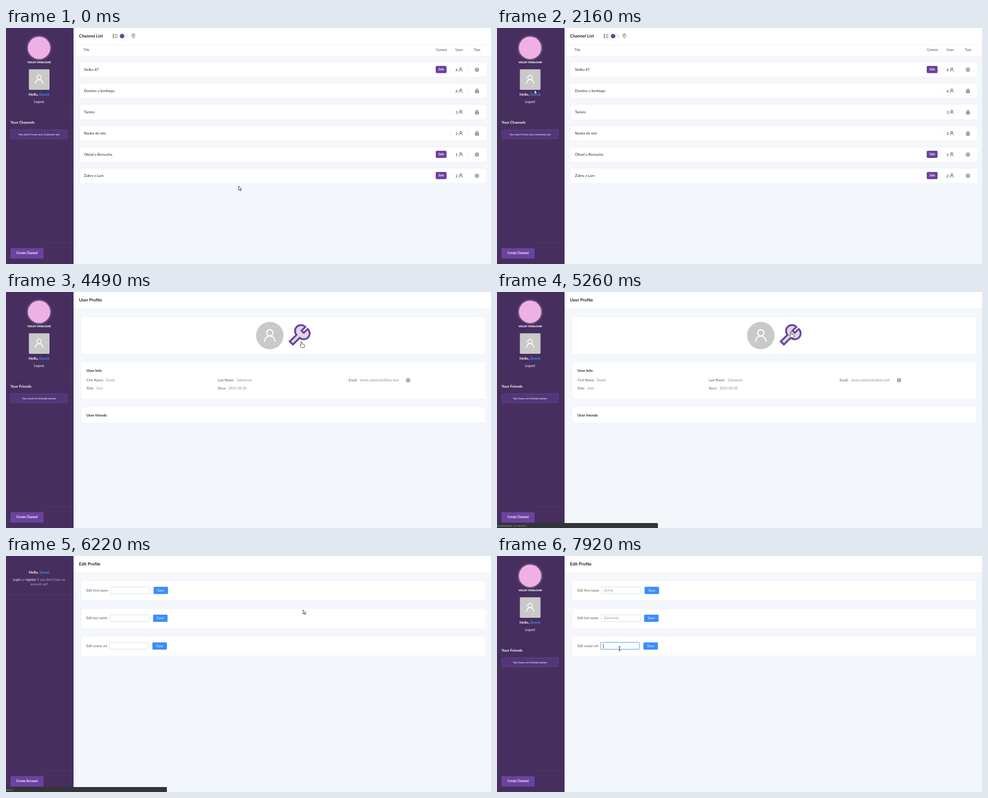
Animation, 1070 px wide and 523 px high, one loop 8 s. Source, as an HTML page with a canvas:

```html
<!DOCTYPE html>
<html lang="en">
<meta charset="utf-8">
<title>Channels</title>
<style>
  html, body { margin: 0; width: 100%; height: 100%; overflow: hidden; background: #fff; }
  canvas { display: block; }
</style>
<canvas id="stage" width="1070" height="523"></canvas>
<script>
const ctx = document.getElementById('stage').getContext('2d');
const LOOP = 8000, TICK = 77.6, PHASE = 26;   // the screen refreshes once per tick
const PURPLE = '#6c429f', SIDEBAR = '#462f5e', GREY = '#c9c9c9', INK = '#24222b', BLUE = '#3b8dff';
const FIRST = 'Dorek', LAST = 'Zalmierski', EMAIL = 'dorek.zalmierski@listy.test';

const CHANNELS = [
  ['Stelka 47', 4, true], ['Domino u borkiego', 4, false], ['Tamiro', 3, false],
  ['Nauka do wtz', 3, false], ['Obiad u Borsucha', 1, true], ['Żubry z Lum', 2, true]
];

// Pointer position: [tick, x, y]
const TRACK = [
  [0, 513, 350], [2, 513, 350], [3, 512, 350], [4, 513, 350], [9, 513, 350], [11, 505, 353],
  [20, 173, 249], [28, 82, 137], [31, 83, 143], [43, 83, 143], [48, 280, 201], [54, 638, 134],
  [58, 651, 110], [61, 655, 50], [64, 649, 88], [65, 649, 88], [66, 647, 88], [71, 649, 88],
  [72, 650, 95], [74, 650, 95], [80, 655, 119], [85, 630, 162], [96, 270, 206], [98, 270, 206],
  [99, 270, 205], [103, 270, 205]
];

const ARROW = new Path2D('M0 0V9.5L2.2 7.6 3.6 10.8 5 10.2 3.6 7.1H6.6Z');
const HAND = new Path2D('M-1 8V1a1.2 1.2 0 0 1 2.4 0V5L6 6q1.4.5 1.2 2L6.4 13H0L-3 8q.4-1.7 2 0Z');
const BEAM = new Path2D('M-2.5-4.5H-.7L0-4 .7-4.5H2.5M0-4V4M-2.5 4.5H-.7L0 4 .7 4.5H2.5');
const WRENCH = new Path2D('M626 109.5L641 95A12 12 0 0 1 660.5 77.5L652 85.5 657 90.5 665.5 82A12 12 0 0 1 648 101.5L633 116.5Z');
const PIN = new Path2D('M281 22.5C279 20 277.5 18.5 277.5 16.5a3.5 3.5 0 0 1 7 0C284.5 18.5 283 20 281 22.5Z');

function box(x, y, w, h, fill, radius = 0, border) {
  ctx.beginPath();
  ctx.roundRect(x, y, w, h, radius);
  ctx.fillStyle = fill;
  ctx.fill();
  if (border) stroke(border, 1);
}

function stroke(color, width, path) {
  ctx.strokeStyle = color;
  ctx.lineWidth = width;
  path ? ctx.stroke(path) : ctx.stroke();
}

function line(color, width, ...points) {
  ctx.beginPath();
  for (let i = 0; i < points.length; i += 4) {
    ctx.moveTo(points[i], points[i + 1]);
    ctx.lineTo(points[i + 2], points[i + 3]);
  }
  stroke(color, width);
}

function circle(x, y, r, fill) {
  ctx.beginPath();
  ctx.arc(x, y, r, 0, 7);
  if (fill) { ctx.fillStyle = fill; ctx.fill(); }
}

// y is the middle of the line; returns the x where the text ends
function text(s, x, y, size, color = INK, weight = 400, align = 'left') {
  ctx.font = `${weight} ${size}px Lato, sans-serif`;
  ctx.textAlign = align;
  ctx.fillStyle = color;
  ctx.fillText(s, x, y + size * 0.34);
  return x + ctx.measureText(s).width;
}

// Several coloured pieces on one centred line
function centred(parts, x, y, size, weight) {
  ctx.font = `${weight} ${size}px Lato, sans-serif`;
  x -= ctx.measureText(parts.map(p => p[0]).join('')).width / 2;
  for (const [s, color] of parts) x = text(s, x, y, size, color, weight);
}

function person(x, y, scale, color, width) {
  circle(x, y - 4 * scale, 5 * scale);
  stroke(color, width);
  ctx.beginPath();
  ctx.moveTo(x - 8.5 * scale, y + 10 * scale);
  ctx.bezierCurveTo(x - 7 * scale, y - 2 * scale, x + 7 * scale, y - 2 * scale, x + 8.5 * scale, y + 10 * scale);
  stroke(color, width);
}

function crossIcon(x, y) {
  circle(x, y, 3.8);
  stroke(INK, 1);
  line(INK, 1, x - 1.5, y - 1.5, x + 1.5, y + 1.5, x + 1.5, y - 1.5, x - 1.5, y + 1.5);
}

function lockIcon(x, y) {
  box(x - 3.5, y, 7, 4, '#fff', 0.5, INK);
  ctx.beginPath();
  ctx.arc(x, y - 2, 2.2, Math.PI, 0);
  ctx.lineTo(x + 2.2, y);
  ctx.moveTo(x - 2.2, y);
  ctx.lineTo(x - 2.2, y - 2);
  stroke(INK, 1);
  line(INK, 1, x - 1, y + 2, x + 1, y + 2);
}

const card = (x, y, w, h) => box(x + .5, y + .5, w - 1, h - 1, '#fff', 2, '#eff1f6');

function sidebar(user, heading, message) {
  box(0, 0, 149, 523, SIDEBAR);
  const rule = y => line('#523a6c', 1, 0, y, 149, y);
  if (user) {
    ctx.shadowColor = '#efb0e5';
    ctx.shadowBlur = 5;
    circle(73, 44, 24.5, '#efb0e5');
    ctx.shadowBlur = 0;
    text('VELDY PARLOUR', 73, 75.5, 6.4, '#fff', 900, 'center');
    box(50.5, 91.5, 45.5, 45.5, GREY, 2);
    person(73, 113.5, 1, '#fff', 1.8);
    centred([['Hello, ', '#fff'], [FIRST, '#3f94f5']], 73, 147, 8.3, 700);
    text('Logout', 73, 163.5, 7.4, '#fff', 400, 'center');
    rule(186.5);
    text(heading, 10, 209, 8.3, '#fff', 700);
    box(10.5, 225.5, 125, 20, '#523679', 3, '#644389');
    text(message, 73, 235.5, 6.5, '#fff', 400, 'center');
  } else {
    const dim = '#b5a8c4';
    centred([['Hello, ', '#fff'], ['Guest', '#3f94f5']], 73, 36.5, 8.3, 700);
    centred([['Login', '#fff'], [' or ', dim], ['register', '#fff'], [" if you don't have an", dim]], 73, 53, 7.2, 400);
    text('account yet!', 73, 63, 7.2, dim, 400, 'center');
    rule(86.5);
  }
  rule(475.5);
  box(10, 488, 73, 23, PURPLE, 3);
  text(user ? 'Create Channel' : 'Create Account', 46.5, 499, 6.9, '#fff', 700, 'center');
}

function header(title) {
  box(149, 0, 921, 523, '#f4f7fc');
  box(149, 0, 921, 37, '#fff');
  line('#eef1f6', 1, 149, 37.5, 1070, 37.5);
  text(title, 161, 17.5, 9.7, INK, 700);
}

function listPage() {
  header('Channel List');
  box(149, 38, 921, 24, '#fff');
  line('#eef0f4', 1, 149, 62.5, 1070, 62.5);
  for (const y of [14.5, 18, 21.5]) {
    line('#555', 1, 239.5, y, 246, y);
    box(235.5, y - 1, 2.5, 2, '#555');
  }
  box(251, 13.5, 20, 9, '#edf2f8', 4.5);
  circle(256, 18, 5, PURPLE);
  stroke('#555', 1, PIN);
  circle(281, 16.5, 1.2);
  stroke('#555', .8);

  text('Title', 171, 49, 6.6, '#444');
  [['Connect', 961], ['Users', 1000], ['Type', 1039.5]]
    .forEach(([s, x]) => text(s, x, 49, 6.6, '#444', 400, 'center'));

  CHANNELS.forEach(([name, users, open], i) => {
    const y = 92.5 + 47 * i;
    card(162, y - 17, 899, 34);
    text(name, 172, y, 8, INK);
    line('#f3f3f6', 1, 980.5, y - 8, 980.5, y + 8, 1019.5, y - 8, 1019.5, y + 8);
    if (open) {
      box(948, y - 8.5, 24, 16, PURPLE, 3);
      text('Join', 960, y - .5, 6.9, '#fff', 700, 'center');
    }
    text(users, 994, y + .5, 8, INK, 400, 'center');
    person(1003.3, y - .5, .45, INK, .9);
    open ? crossIcon(1039, y) : lockIcon(1039, y);
  });
}

function profilePage() {
  header('User Profile');
  card(165, 54, 893, 85);
  card(165, 155, 893, 83);
  card(165, 254, 893, 37);
  circle(582, 96.5, 30.3, GREY);
  person(582, 96, 1.4, '#fff', 2.5);
  ctx.fillStyle = '#ddd5e4';
  ctx.fill(WRENCH);
  stroke(PURPLE, 4, WRENCH);
  text('User Info', 177.5, 174.5, 8.3, INK, 700);
  const field = (label, value, x, valueX, y) => {
    text(label, x, y, 7.4, '#555');
    text(value, valueX, y, 7.4, '#8a8a8a');
  };
  field('First Name:', FIRST, 178, 220, 195);
  field('Role:', 'User', 178, 199, 213);
  field('Last Name:', LAST, 467, 509, 195);
  field('Since:', '2019-08-20', 467, 491, 213);
  field('Email:', EMAIL, 756, 781, 195);
  crossIcon(887, 195.5);
  text('User friends', 177.5, 273, 8.3, INK, 700);
}

function editPage(user, hovered, focused) {
  header('Edit Profile');
  [['first name:', 231, FIRST], ['last name:', 230, LAST], ['avatar url:', 228.5, '']].forEach(([label, x, value], i) => {
    const y = 76 + 61.6 * i, active = i === 2 && hovered;
    card(165, Math.round(y) - 22, 893, 45);
    text('Edit ' + label, 177.5, y, 7.4, '#555');
    if (active && focused) box(x - 1, y - 9, 88, 18, '#d6eaff', 3);
    box(x, Math.round(y) - 7.5, 86, 15, '#fff', 2, active ? '#4a9eff' : '#d9dbe0');
    if (user) text(value, x + 5.5, y, 7.4, '#999');
    if (active && focused) line('#333', 1, 234.5, 195, 234.5, 204);
    box(x + 94.5, y - 7.7, 32, 16, BLUE, 2);
    text('Save', x + 110.5, y, 7.6, '#fff', 400, 'center');
  });
}

function statusBar(message, alpha = 1) {
  ctx.globalAlpha = alpha;
  box(-3, 512, 358, 14, '#323438', 2);
  text(message, -2, 518, 6.4, '#a3a5a9');
  ctx.globalAlpha = 1;
}

function pointer(k) {
  const i = Math.max(1, TRACK.findIndex(p => p[0] >= k));
  const [k0, x0, y0] = TRACK[i - 1], [k1, x1, y1] = TRACK[i];
  const f = (k - k0) / (k1 - k0);
  const hand = (k >= 30 && k < 44) || (k >= 57 && k < 60) || (k >= 63 && k < 72);
  ctx.save();
  ctx.translate(Math.round(x0 + (x1 - x0) * f) + .5, Math.round(y0 + (y1 - y0) * f) + .2);
  if (k >= 96) {
    stroke('#222', 1, BEAM);
  } else {
    const shape = hand ? HAND : ARROW;
    ctx.fillStyle = '#fff';
    ctx.fill(shape);
    stroke('#222', .9, shape);
  }
  ctx.restore();
}

function draw(time) {
  const k = Math.floor((time % LOOP + PHASE) / TICK);
  box(0, 0, 1070, 523, '#fefefe');
  if (k < 36) {
    listPage();
    sidebar(true, 'Your Channels', "You don't have any channels yet");
  } else if (k < 72) {
    profilePage();
    sidebar(true, 'Your Friends', 'You have no friends looser');
  } else if (k >= 75) {
    const user = k >= 83;
    editPage(user, k >= 97, k >= 101);
    sidebar(user, 'Your Friends', 'You have no friends looser');
  }
  if (k >= 31 && k < 51) statusBar('devserver:4200/members/7a1ce94f20d86b3158e4c072', Math.min(1, (k - 30) / 3));
  else if (k >= 60 && k < 68) statusBar('devserver:4200/edit');
  else if (k >= 68 && k < 70) statusBar('Oczekiwanie na serwer…');
  else if (k >= 70 && k < 86) statusBar('Łączę...');
  pointer(k);
}

function frame() {
  draw(performance.now());
  requestAnimationFrame(frame);
}
frame();
</script>
</html>
```
